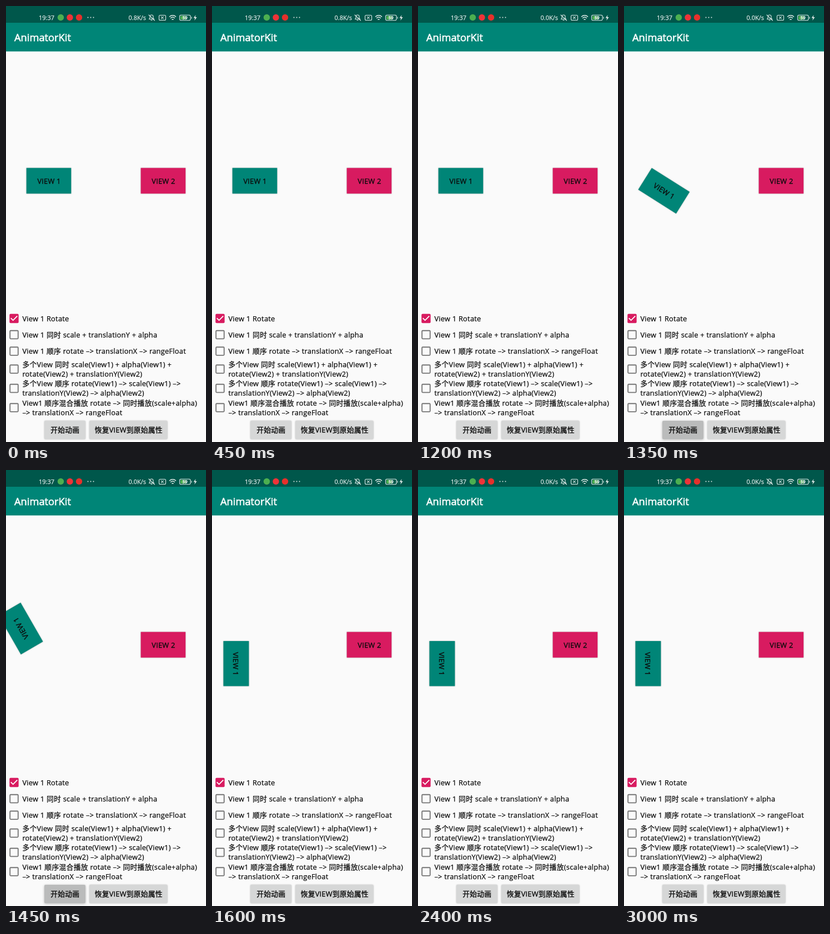
Recreate the animation shown at these times as an HTML page. Size 360 by 780 pixels, loop 3.35 s.

```html
<!DOCTYPE html>
<html lang="zh">
<head>
<meta charset="utf-8">
<style>
html, body { margin: 0; width: 100%; height: 100%; overflow: hidden; background: #fafafa; }
svg { display: block; width: 360px; height: 780px; }
text {
  font: 12.83px "Open Sans", "Noto Sans CJK SC", "Noto Sans CJK", sans-serif;
  fill: currentColor; stroke: currentColor; stroke-width: .25; color: #0c0c0c; white-space: pre;
}
.option { letter-spacing: .25px; }
.label { letter-spacing: .2px; stroke-width: .35; text-anchor: middle; }
.title { font-size: 18.3px; stroke-width: .6; color: #fff; }
.status { font-size: 11px; color: #dfe9e7; }
.icon { fill: none; stroke: #dfe9e7; stroke-width: 1.1; stroke-linecap: round; stroke-linejoin: round; }
.raised { filter: drop-shadow(0 .8px 1px #0004); }
</style>
</head>
<body>
<svg viewBox="0 0 360 780">
  <rect width="360" height="780" fill="#fafafa"/>
  <rect width="360" height="81.300" fill="#008577"/>
  <rect width="360" height="30" fill="#00574b"/>
  <text class="title" x="15" y="63">AnimatorKit</text>

  <text class="status" x="59" y="24.6">19:37</text>
  <circle cx="98.500" cy="20.500" r="5.700" fill="#4caf50"/>
  <circle cx="115" cy="20.500" r="5.700" fill="#ee3338"/>
  <circle cx="131.500" cy="20.500" r="5.700" fill="#e6302b"/>
  <path class="icon" style="stroke-width:2" d="M147.500 20.500h0m5 0h0m5 0h0"/>
  <text class="status" id="speed" x="220.500" y="24.6"></text>
  <path class="icon" d="M257.500 23.500h9l-1.500-2v-2.500a3 3 0 0 0-6 0v2.500zM260.800 25.500h2.400M257 16l10.500 10"/>
  <rect class="icon" x="275.500" y="16.500" width="12" height="9" rx="2"/>
  <path class="icon" d="M279.700 19.200l3.600 3.600m0-3.600l-3.600 3.600"/>
  <path class="icon" style="stroke-width:1.5" d="M294.500 19a7.800 7.800 0 0 1 11 0M296.600 21.500a4.800 4.800 0 0 1 6.800 0M299 24.200a1.600 1.600 0 0 1 2 0"/>
  <rect class="icon" x="312.500" y="16.300" width="19.500" height="9.400" rx="2.500"/>
  <rect x="314" y="17.800" width="10" height="6.400" rx="1" fill="#4caf50"/>
  <path class="icon" d="M334 19.800v2.400"/>
  <text class="status" style="font-size:8px;font-weight:700" x="317.500" y="24">59</text>
  <path fill="#dfe9e7" d="M341.500 16l-4 5.500h2.700l-1 4.500 4.300-6h-2.800z"/>

  <g class="raised">
    <g id="view1">
      <rect x="36.700" y="289.700" width="80.600" height="45.900" fill="#008577"/>
      <text class="label" x="77.500" y="317.700">VIEW 1</text>
    </g>
  </g>
  <g class="raised">
    <rect x="242.600" y="289.700" width="80.600" height="45.900" fill="#d81b60"/>
    <text class="label" x="283.400" y="317.700">VIEW 2</text>
  </g>

  <g id="options"></g>

  <g class="raised" id="start">
    <rect x="69" y="742" width="74" height="33" rx="2" fill="#d6d7d7"/>
  </g>
  <rect id="ripple" x="69" y="742" width="74" height="33" rx="2"/>
  <text class="label" x="106.300" y="763.300">开始动画</text>
  <g class="raised"><rect x="150" y="742" width="140.500" height="33" rx="2" fill="#d6d7d7"/></g>
  <text class="label" x="220.800" y="763.300">恢复VIEW到原始属性</text>
</svg>
<script>
const $ = id => document.getElementById(id);
const clamp = v => Math.min(1, Math.max(0, v));
const LOOP = 3350, TICK = 50;

// Each option: centre of its checkbox, then its lines of text
const options = [
  [559, 'View 1 Rotate'],
  [588, 'View 1 同时 scale + translationY + alpha'],
  [617.5, 'View 1 顺序 rotate –> translationX –> rangeFloat'],
  [649.5, '多个View 同时 scale(View1) + alpha(View1) +', 'rotate(View2) + translationY(View2)'],
  [684, '多个View 顺序 rotate(View1) –> scale(View1) –>', 'translationY(View2) –> alpha(View2)'],
  [718.5, 'View1 顺序混合播放 rotate –> 同时播放(scale+alpha)', '–> translationX –> rangeFloat']
];

$('options').innerHTML = options.map(([y, ...lines], i) => {
  const box = i
    ? `<rect x="7.200" y="${y - 7.3}" width="14.600" height="14.600" rx="1.200" fill="none" stroke="#757575" stroke-width="1.850"/>`
    : `<rect x="6.300" y="${y - 8.2}" width="16.400" height="16.400" rx="2" fill="#d81b60"/>
       <path d="M8.700 ${y - .6}l4 3.900 7.600-7.600" fill="none" stroke="#fff" stroke-width="1.850"/>`;
  const first = y + 4.7 - (lines.length - 1) * 8.6;
  return box + lines.map((line, n) =>
    `<text class="option" x="29.400" y="${first + n * 17.2}">${line}</text>`).join('');
}).join('');

// Turns 0 -> 240 -> 90 degrees, eased over the whole run
function angleAt(t) {
  const p = (1 - Math.cos(Math.PI * clamp((t - 1300) / 300))) / 2;
  return p < .5 ? 480 * p : 240 - 300 * (p - .5);
}

function draw(now) {
  const t = Math.floor(Math.max(0, now - origin) % LOOP / TICK) * TICK;
  const press = clamp((t - 1200) / 100) * clamp((1600 - t) / 100);
  $('speed').textContent = t < 1050 ? '0.8K/s' : '0.0K/s';
  $('view1').setAttribute('transform', `rotate(${angleAt(t)} 43.400 312.700)`);
  $('ripple').setAttribute('opacity', .13 * press);
  $('start').style.filter = `drop-shadow(0 ${.8 + press}px ${1 + press}px #0004)`;
  requestAnimationFrame(draw);
}

const origin = performance.now();
draw(origin);
</script>
</body>
</html>
```
